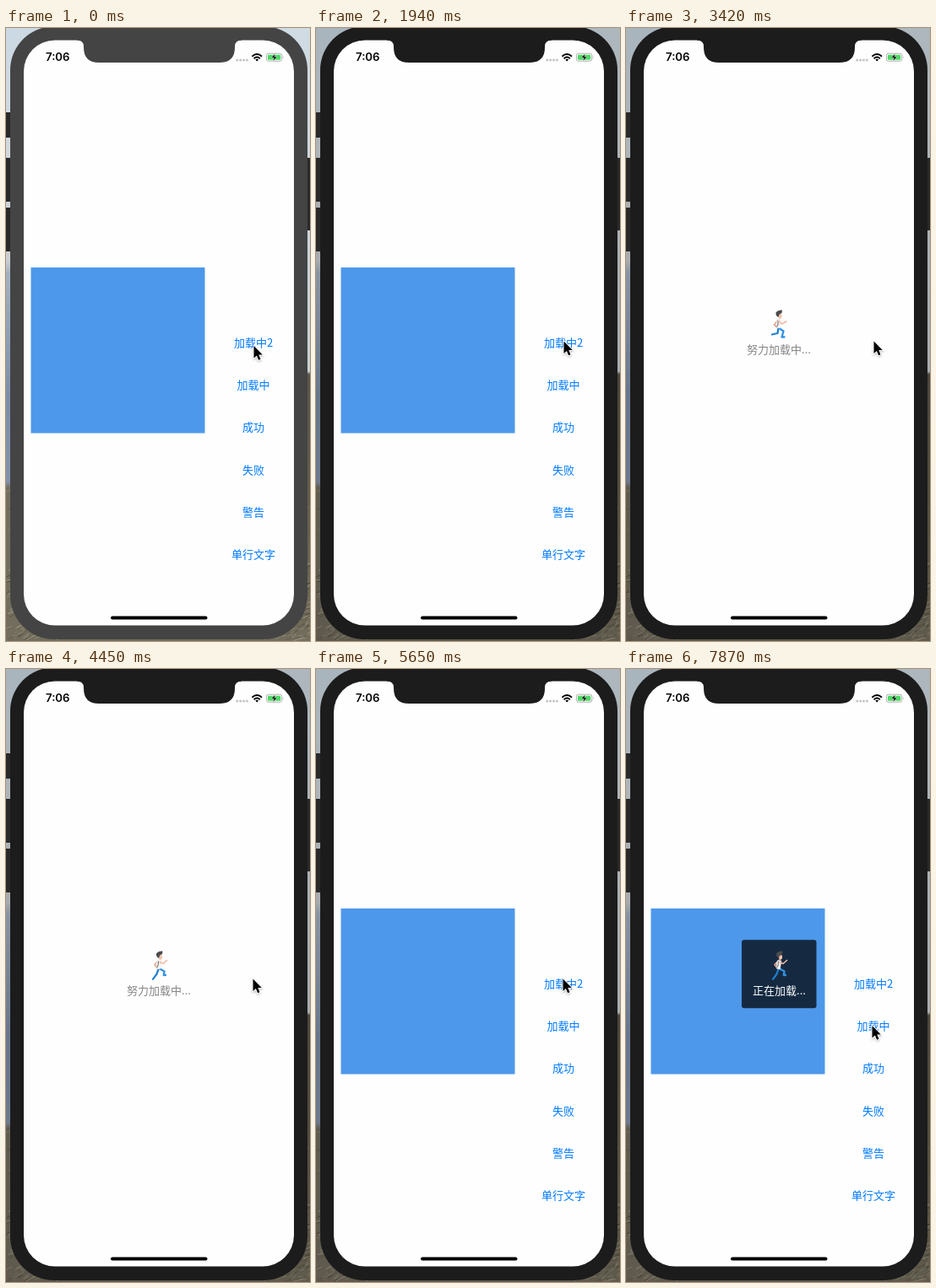
Write an HTML page that moves like this. It is 360 by 727 pixels and loops after 8000 ms.

```html
<!DOCTYPE html>
<html lang="zh-CN">
<head>
<meta charset="utf-8">
<title>Loading demo</title>
<style>
  html, body { margin: 0; width: 100%; height: 100%; overflow: hidden; background: #d5e1ea; }
  svg { display: block; width: 100%; height: 100%; }
  text { font: 13px "Noto Sans CJK SC", "Noto Sans CJK", sans-serif; text-anchor: middle; }
  .clock { font: 600 13.2px Inter, sans-serif; text-anchor: start; }
  .limb { fill: none; stroke-linecap: round; stroke-linejoin: round; }
</style>
</head>
<body>
<svg id="stage" viewBox="0 0 360 727" preserveAspectRatio="none">
  <defs>
    <linearGradient id="left" x2="0" y2="1">
      <stop offset="0" stop-color="#d3e2ed"/>
      <stop offset=".2" stop-color="#d9e2e8"/>
      <stop offset=".38" stop-color="#d2d6da"/>
      <stop offset=".4" stop-color="#a9b9cb"/>
      <stop offset=".6" stop-color="#8194b0"/>
      <stop offset=".74" stop-color="#8798b3"/>
      <stop offset=".75" stop-color="#777364"/>
      <stop offset="1" stop-color="#777160"/>
    </linearGradient>
    <linearGradient id="right" x2="0" y2="1">
      <stop offset="0" stop-color="#d8e4ec"/>
      <stop offset=".56" stop-color="#cfd7dc"/>
      <stop offset=".565" stop-color="#5d584c"/>
      <stop offset=".75" stop-color="#66614f"/>
      <stop offset="1" stop-color="#777160"/>
    </linearGradient>
    <filter id="soft" x="-50%" y="-50%" width="200%" height="200%">
      <feDropShadow dx="0" dy="1" stdDeviation=".8" flood-opacity=".35"/>
    </filter>
  </defs>

  <rect width="180" height="727" fill="url(#left)"/>
  <rect x="180" width="180" height="727" fill="url(#right)"/>
  <g id="grass" fill="none" stroke-width="1"></g>
  <rect id="shade" width="360" height="727" fill="#000"/>

  <g fill="#292929">
    <rect x="-3" y="100" width="10" height="30" rx="2"/>
    <rect x="-3" y="154" width="10" height="52" rx="2"/>
    <rect x="-3" y="213" width="10" height="52" rx="2"/>
    <rect x="355" y="154" width="8" height="86" rx="2"/>
  </g>
  <rect id="body" x="5" y="-2" width="352" height="727" rx="52"/>
  <rect x="21" y="14.5" width="320" height="694" rx="37" fill="#fefefe"/>
  <path id="notch" d="M84 14H279V14.5Q271 14.5 271 22V23Q271 41 253 41H110Q92 41 92 23V22Q92 14.5 84 14.5Z"/>

  <text class="clock" x="47" y="39.3">7:06</text>
  <g fill="#c4c4c4">
    <circle cx="273.7" cy="38" r="1.5"/><circle cx="277.6" cy="38" r="1.5"/>
    <circle cx="281.5" cy="38" r="1.5"/><circle cx="285.4" cy="38" r="1.5"/>
  </g>
  <g fill="none" stroke="#000" stroke-width="1.9">
    <path d="M291.4 33.7Q297.2 28.4 303 33.7"/>
    <path d="M293.6 36.2Q297.2 33 300.8 36.2"/>
    <path d="M295.3 37.4Q297.2 35.9 299.1 37.4L297.2 39.6Z" fill="#000" stroke="none"/>
  </g>
  <rect x="308.4" y="30.2" width="18.4" height="9" rx="2.4" fill="#fff" stroke="#a5a5a5" stroke-width=".9"/>
  <rect x="309.9" y="31.7" width="15.4" height="6" rx="1.2" fill="#4cd964"/>
  <path d="M328 33.2q1.3 1.5 0 3z" fill="#a5a5a5"/>
  <path d="M318.8 30.2L314.3 35.3H317.2L316.4 39.2L320.9 34.1H318Z" stroke="#fff" stroke-width=".4"/>
  <rect x="124" y="697.4" width="114.5" height="4.2" rx="2.1"/>

  <rect x="29.5" y="284" width="206" height="196.5" fill="#4d98eb"/>
  <g id="menu" fill="#007aff"></g>

  <g id="page">
    <rect x="23" y="60" width="316" height="600" fill="#fefefe"/>
    <g id="pageBody">
      <g class="runner"></g>
      <text x="181" y="386.4" fill="#858585">努力加载中...</text>
    </g>
  </g>
  <g id="hud">
    <rect x="137" y="321.3" width="88.5" height="81" rx="3" fill="#000" fill-opacity=".72"/>
    <g class="runner"></g>
    <text x="181.5" y="386.4" fill="#fff">正在加载...</text>
  </g>

  <g id="cursor" filter="url(#soft)">
    <path d="M0 0V14.6L3.4 11.4L5.6 16.8L8 15.8L5.8 10.5H10.3Z" stroke="#fff" stroke-width="1.7" paint-order="stroke"/>
  </g>
</svg>
<script>
const LOOP = 8000, START = 2390, STEP = 148;
const FOCUS = 1940;
const PAGE_END = 22, PRESS = 29, HUD_START = 30;
const POSE_RATE = STEP / 106;

const $ = id => document.getElementById(id);
const menu = ['加载中2', '加载中', '成功', '失败', '警告', '单行文字'];

// time, x, y of the pointer tip
const pointer = [
  [0, 293.5, 377], [150, 293, 376.5], [300, 292, 376], [1050, 292, 377],
  [1200, 292, 378.5], [1490, 293, 375], [1640, 293.5, 371.5],
  [3870, 293, 369], [4015, 292.5, 367.5], [6090, 292.5, 375],
  [6235, 292.3, 392], [6385, 292, 410], [6530, 291.5, 420], [6680, 291.5, 423]
];

const poses = [
  { back: 'M180 356L181.5 361.5L175.5 361', front: 'M180 356L185.5 360.5L182 368H185.5',
    rear: 'M178.5 348L176 353L179 356', arm: 'M180 347.5L183 351L189.5 350.5', lean: 0 },
  { back: 'M180.5 355.5L179.5 362L173 363.5', front: 'M180.5 355.5L186.5 359.5L184.5 366.5H187.5',
    rear: 'M179 347.5L175.5 352L179 355', arm: 'M181 347.5L184.5 351L190 348', lean: .5 },
  { back: 'M181 355L178.3 362L174 367.8', front: 'M181 355L187.5 358.5L186.8 363H189',
    rear: 'M179.5 347L176 350.5L178.5 354', arm: 'M182 347.5L186 349.5L190.5 345.5', lean: 1 }
];

const limb = (d, color, width) =>
  `<path class="limb" d="${d}" stroke="${color}" stroke-width="${width}"/>`;

function drawPose({ back, front, rear, arm, lean }) {
  return `<g>
    ${limb(rear, '#e8a58c', 1.7)}
    ${limb(back, '#1f7fd0', 2.2)}${limb(front, '#3292e4', 2.3)}
    <path d="M${179 + lean} 345L${183 + lean} 346L182.5 356L178.5 355.5L178 349Z" fill="#f7f7f7" stroke="#d8d8d8" stroke-width=".4"/>
    ${limb(`M${179.5 + lean} 347L180 352L178.8 354`, '#5a4a4a', .9)}
    ${limb(arm, '#f2b9a0', 1.6)}
    <g transform="translate(${lean} 0)">
      <path d="M179.5 339.5H184V343Q183 345.5 180.5 345Z" fill="#f4c2aa"/>
      <path d="M177 337.5Q179 334.5 184.5 334.5L184 338L181 339.8L180 343Q176.5 341.5 177 337.5Z" fill="#4b4b4d"/>
    </g>
  </g>`;
}

function random(seed) {
  return () => (seed = seed * 16807 % 2147483647) / 2147483647;
}

function drawGrass() {
  const next = random(71);
  $('grass').innerHTML = ['#4a4639', '#9a9482', '#5f5947', '#b0a994'].map(color => {
    let d = '';
    for (let i = 0; i < 170; i++) {
      const x = next() * 62 + (i % 2 ? 298 : 0);
      const y = 545 + 182 * Math.sqrt(next());
      d += `M${x.toFixed(1)} ${y.toFixed(1)}l${(3 + next() * 4).toFixed(1)} ${(-1 - next() * 3).toFixed(1)}`;
    }
    return `<path d="${d}" stroke="${color}" opacity=".7"/>`;
  }).join('');
}

drawGrass();
$('menu').innerHTML = menu.map((label, i) =>
  `<text x="293" y="${(377.6 + i * 50.35).toFixed(1)}">${label}</text>`).join('');
const pressed = $('menu').children[1];
const runners = [...document.querySelectorAll('.runner')];
runners.forEach(r => r.innerHTML = poses.map(drawPose).join(''));

const show = (el, on) => el.style.display = on ? '' : 'none';

function setPose(runner, phase) {
  const n = Math.floor(phase) % poses.length;
  [...runner.children].forEach((g, i) => show(g, i === n));
}

function render(t) {
  const step = Math.floor((t - START + 20) / STEP);
  const focused = t >= FOCUS;
  const frame = focused ? '#1c1c1c' : '#444';
  $('body').setAttribute('fill', frame);
  $('notch').setAttribute('fill', frame);
  $('shade').setAttribute('opacity', focused ? .2 : .04);

  const [, x, y] = pointer.findLast(p => p[0] <= t + 10);
  $('cursor').setAttribute('transform', `translate(${x} ${y})`);

  const loading = t >= START && step < PAGE_END;
  show($('page'), loading);
  if (loading) {
    $('page').setAttribute('opacity', step === PAGE_END - 1 ? .45 : 1);
    $('pageBody').setAttribute('opacity', step === 0 ? .72 : 1);
    setPose(runners[0], step * POSE_RATE + .6);
  }

  const hud = step >= HUD_START;
  show($('hud'), hud);
  if (hud) {
    $('hud').setAttribute('opacity', step === HUD_START ? .93 : 1);
    setPose(runners[1], (step - HUD_START) * POSE_RATE + 2.1);
  }
  const since = step - PRESS;
  pressed.setAttribute('opacity', since < 0 ? 1 : Math.min(1, .2 + since * .35));
}

function tick() {
  render(performance.now() % LOOP);
  requestAnimationFrame(tick);
}
tick();
</script>
</body>
</html>
```
